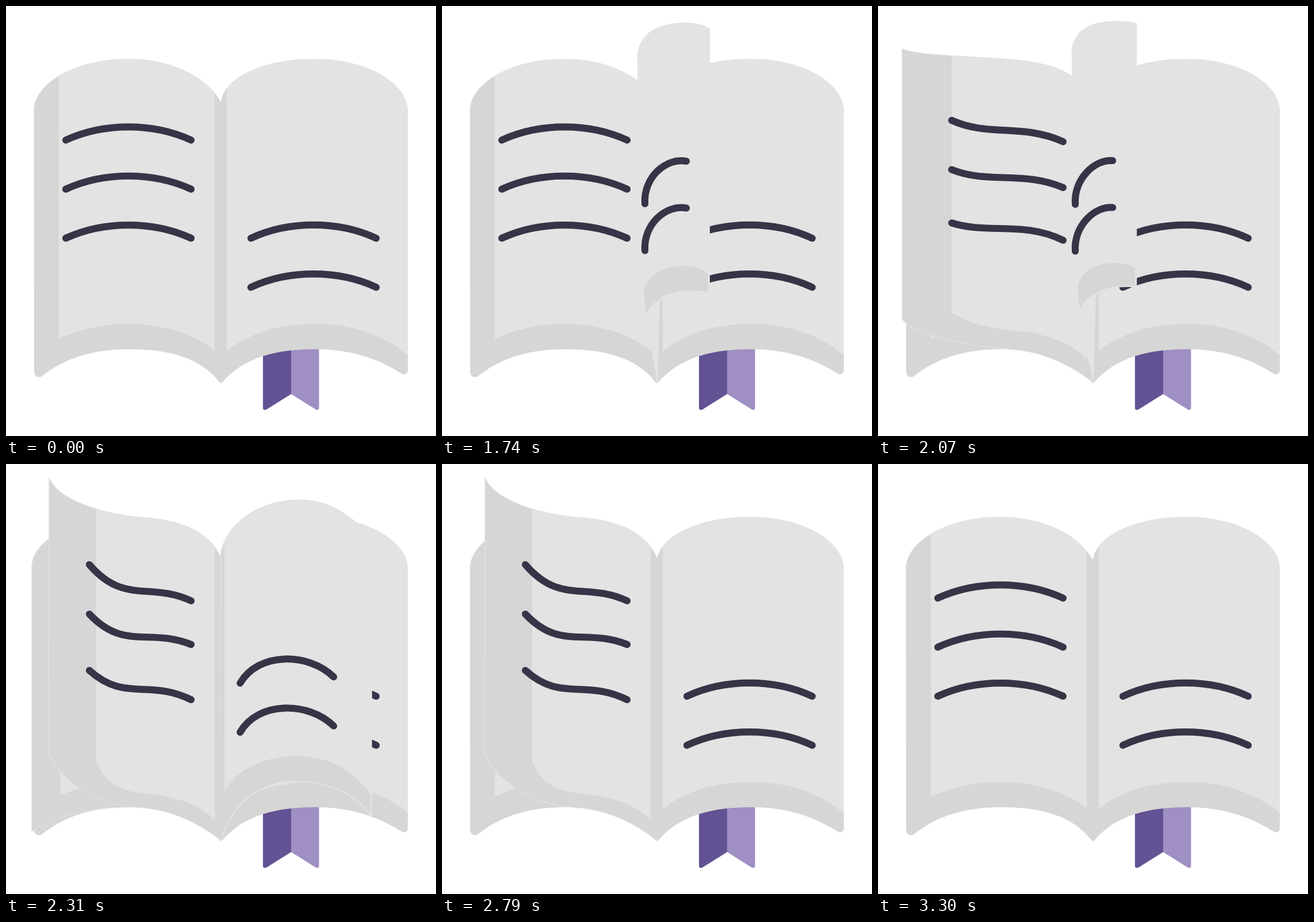
Animation, 748 px wide and 748 px high, one loop 3330 ms. Source, as an HTML page with a canvas:

```html
<!DOCTYPE html>
<html lang="en">
<head>
<meta charset="utf-8">
<title>Turning pages</title>
<style>
html, body { margin: 0; width: 100%; height: 100%; overflow: hidden; background: #fff; }
canvas { display: block; width: 100vw; height: 100vh; }
</style>
</head>
<body>
<canvas id="stage" width="748" height="748"></canvas>
<script>
const ctx = document.getElementById('stage').getContext('2d');
const LOOP = 3330, STEP = 30;
const PAPER = '#e3e3e3', SHADE = '#d6d6d6', INK = '#383347';
const TURN = 335, PEAK = 490, REST = 930;

// Each page reaches its raised pose on the left at `peak`.
const pages = [
  { start: 1500, peak: 1990 },
  { start: 1808, peak: 2310 },
  { start: 2231, peak: 2790 }
];

const linear = u => u;
const easeIn = u => u * u;
const easeOut = u => 1 - (1 - u) * (1 - u);
const softIn = u => Math.pow(u, 1.25);

// Right-hand face: outline, spine side, bottom shading, spine strip width.
const front = [
  { at: 0,
    edge: 'M374 168 C378 125 447 92 537 92 C626 92 699 133 699 183 L698 653 C660 616 600 597 537 597 C474 597 415 611 374 655 L374 655',
    side: 'C374 500 374 320 374 168',
    band: 'M699 609 C660 572 600 553 537 553 C474 553 420 570 384 601 L384 646 C424 612 480 597 537 597 C600 597 660 616 698 653',
    strip: 10 },
  { at: 70, ease: easeIn,
    edge: 'M373 160 C380 105 440 62 508 62 C555 62 590 80 635 128 L634 612 C610 575 560 551 505 551 C440 551 392 590 374 655 L374 655',
    side: 'C374 500 373 320 373 160',
    band: 'M632 572 C600 530 560 507 503 507 C450 507 400 530 380 570 L380 640 C400 585 450 551 505 551 C560 551 610 575 634 612',
    strip: 6 },
  { at: 256,
    edge: 'M337 82 C339 50 360 27 415 27 C430 27 440 28 449 31 L449 488 C420 486 400 490 385 497 C382 498 380 501 378 505 L374 655',
    side: 'C366 590 337 600 337 82',
    band: 'M447 456 C440 451 430 447 410 447 C375 447 345 465 344 505 L344 555 C350 525 358 512 372 504 C395 490 420 487 447 490',
    strip: -6 },
  { at: TURN,
    edge: 'M318 60 C319 35 325 14 335 14 C350 10 362 9 372 9 L372 480 C372 482 373 484 373 488 C374 492 374 496 374 500 L374 655',
    side: 'C360 590 318 600 318 60',
    band: 'M370 448 C366 444 360 442 350 442 C335 442 322 460 320 500 L320 545 C325 520 332 502 344 492 C352 484 362 480 370 482',
    strip: -6 }
];

// Left-hand face: outline and lit area.
const back = [
  { at: TURN,
    edge: 'M374 165 C372 140 368 110 362 90 C350 55 335 25 318 8 L318 478 C325 520 340 570 352 590 C362 610 370 630 374 655',
    lit: 'M363 0 L345 0 L345 510 C348 530 350 545 353 560 C356 575 360 585 363 600' },
  { at: PEAK, ease: easeOut,
    edge: 'M374 163 C350 110 290 97 240 93 C170 88 88 62 75 23 L74 503 C90 545 150 592 225 597 C290 600 340 628 374 655',
    lit: 'M363 0 L157 0 L157 519 C175 560 205 569 240 573 C300 578 340 595 363 619' },
  { at: 570, ease: easeIn,
    edge: 'M374 163 C345 110 290 98 240 94 C180 87 70 88 42 74 L42 545 C60 568 130 588 225 597 C290 600 340 628 374 655',
    lit: 'M363 0 L128 0 L128 533 C160 555 210 563 240 565 C300 570 345 592 363 615' },
  { at: 660,
    edge: 'M374 165 C345 110 285 93 225 92 C150 92 60 100 28 142 L28 605 C60 602 140 597 218 597 C290 598 340 624 374 655',
    lit: 'M363 0 L105 0 L105 565 C150 553 190 553 225 557 C290 560 340 580 363 606' },
  { at: REST, ease: easeOut,
    edge: 'M374 168 C350 122 285 92 213 92 C122 92 49 133 49 183 L49 648 C95 613 150 597 213 597 C290 597 340 616 374 655',
    lit: 'M363 0 L92 0 L92 579 C125 563 168 553 213 553 C270 553 325 569 363 599' }
];

// One cubic per text line, shifted down at its start, middle and end.
function rows(p, shifts) {
  return shifts.map(([a, mid = a, b = a]) =>
    `M${p[0]} ${p[1] + a} C${p[2]} ${p[3] + mid} ${p[4]} ${p[5] + mid} ${p[6]} ${p[7] + b}`
  ).join(' ');
}
const two = [[0], [85.3]];
const tilted = [[0], [81.5]];
const three = [[0], [85.3], [170.6]];
const raised = [[0], [86, 80, 76], [184, 169, 172]];

const flatRight = rows([426, 404, 492, 373.2, 578, 373.2, 644, 404], two);
const flatLeft = rows([104, 233.3, 170, 202.8, 256, 202.8, 322, 233.3], three);
const highLeft = rows([145, 175, 205, 245, 250, 205, 322, 238], raised);

const frontInk = [
  { at: 0, d: flatRight },
  { at: 70, ease: softIn, d: rows([407, 381, 438, 326, 526, 327, 569, 370], two) },
  { at: 240, d: rows([353, 344, 350, 298, 390, 263, 425, 270], tilted) },
  { at: 256, d: rows([343, 345, 340, 300, 378, 266, 408, 269], tilted) },
  { at: TURN, d: rows([324, 346, 322, 305, 332, 280, 342, 272], tilted) }
];
const backInk = [
  { at: TURN, d: rows([340, 170, 346, 215, 352, 210, 357, 235], raised) },
  { at: PEAK, ease: easeOut, d: highLeft },
  { at: 570, ease: easeIn, d: mix(highLeft, flatLeft, 0.41) },
  { at: 660, d: mix(highLeft, flatLeft, 0.72) },
  { at: REST, ease: easeOut, d: flatLeft }
];

function mix(a, b, u) {
  if (typeof a === 'number') return a + (b - a) * u;
  const to = b.match(/[\d.]+/g);
  let i = 0;
  return a.replace(/[\d.]+/g, n => (+n + (to[i++] - n) * u).toFixed(2));
}

function pose(keys, t) {
  let i = 1;
  while (i < keys.length - 1 && t > keys[i].at) i++;
  const a = keys[i - 1], b = keys[i];
  const raw = Math.min(1, Math.max(0, (t - a.at) / (b.at - a.at)));
  const u = (b.ease || linear)(raw), out = {};
  for (const k in a) if (k !== 'at' && k !== 'ease') out[k] = mix(a[k], b[k], u);
  return out;
}

function fill(d, color) {
  ctx.fillStyle = color;
  ctx.fill(new Path2D(d));
}

function stroke(d, color, width) {
  ctx.strokeStyle = color;
  ctx.lineWidth = width;
  ctx.lineCap = ctx.lineJoin = 'round';
  ctx.stroke(new Path2D(d));
}

function inside(d, draw) {
  ctx.save();
  ctx.clip(new Path2D(d));
  draw();
  ctx.restore();
}

function ink(d) { stroke(d, INK, 12.2); }

function drawBook() {
  fill('M447 585 H496 V675 L453 702 Q447 704 447 699 Z', '#635294');
  fill('M496 585 H544.5 V699 Q544 704 539 702 L496 675 Z', '#9f8fc3');

  const left = 'M374.5 168 C350 122 285 92 213 92 C122 92 48.5 133 48.5 183 L49 636 C49 645 58 649 65 642 ' +
    'C105 611 155 597 213 597 C282 597 338 611 371 654 Q373 656 374.5 656 Z';
  const right = 'M374 168 C378 125 447 92 537 92 C626 92 699 133 699 183 V634 C699 640 692 643 686 638 ' +
    'C640 609 590 597 537 597 C474 597 414 610 377 654 Q375 656 374 656 Z';
  fill(left, SHADE);
  inside(left, () => fill(back[4].lit, PAPER));
  fill(right, SHADE);
  inside(right, () =>
    fill('M384 0 H700 V609 C660 572 600 553 537 553 C474 553 420 570 384 601 Z', PAPER));
  ink(flatLeft);
  ink(flatRight);
}

function drawBack(t) {
  const p = pose(back, t);
  fill(p.edge, SHADE);
  inside(p.edge, () => fill(p.lit, PAPER));
  stroke(p.edge, PAPER, 1.2);
  ink(pose(backInk, t).d);
}

function drawFront(t) {
  const p = pose(front, t), shape = p.edge + ' ' + p.side;
  fill(shape, PAPER);
  inside(shape, () => {
    ctx.fillStyle = SHADE;
    ctx.fillRect(374, 0, Math.max(0, p.strip), 748);
    fill(p.band, SHADE);
  });
  stroke(p.edge, PAPER, 2);
  ink(pose(frontInk, t).d);
}

function phase(page, t) {
  return t < page.peak
    ? (t - page.start) / (page.peak - page.start) * PEAK
    : PEAK + t - page.peak;
}

function render(t) {
  ctx.fillStyle = '#fff';
  ctx.fillRect(0, 0, 748, 748);
  drawBook();
  const at = pages.map(p => phase(p, t));
  at.filter(v => v >= TURN && v < REST).forEach(drawBack);
  at.filter(v => v > 0 && v < TURN).reverse().forEach(drawFront);
}

const begin = performance.now();
function tick() {
  const t = (performance.now() - begin) % LOOP;
  render(Math.floor(t / STEP) * STEP);
  requestAnimationFrame(tick);
}
tick();
</script>
</body>
</html>
```
